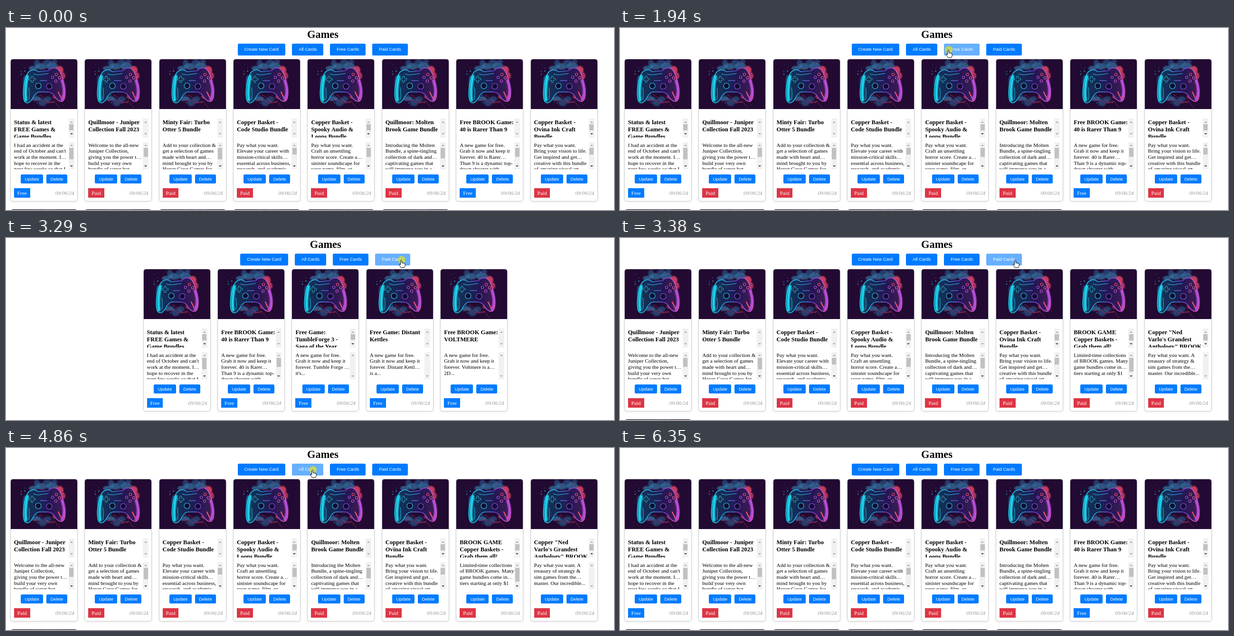
Recreate the animation shown at these times as an HTML page. Size 1280 by 384 pixels, loop 6.94 s.

```html
<!DOCTYPE html>
<html lang="en">
<head>
<meta charset="utf-8">
<title>Games</title>
<style>
html, body { margin: 0; width: 100%; height: 100%; overflow: hidden; background: #fff; }
body { position: relative; color: #000; font: 11.2px/12.6px "Liberation Serif", "Times New Roman", serif; white-space: nowrap; }
#page, #cursor, #click, .card, .card > * { position: absolute; }
#page { left: 0; top: 0; }
h1 { position: absolute; left: 0; top: .8px; width: 1334px; margin: 0; font-size: 22.4px; line-height: 26px; text-align: center; }
#bar { position: absolute; left: 487.6px; top: 33.2px; display: flex; gap: 14.1px; }
.btn { background: #007bff; color: #fff; border-radius: 2.8px; font: 9.4px/24.5px "Liberation Sans", Arial, sans-serif; padding: 0 14px; }
.btn.hover { background: #66b0ff; }
.card { width: 142px; height: 300.5px; box-sizing: border-box; border: 1px solid #ccc; border-radius: 5.6px; overflow: hidden; background: #fff; box-shadow: 0 1px 4px rgba(0,0,0,.1); }
.card svg { left: 0; top: 0; width: 141px; height: 105px; }
.scroll { left: 7px; width: 127px; overflow: hidden; box-sizing: border-box; }
.title { top: 125.2px; height: 39.5px; padding-top: 1px; font-weight: bold; font-size: 12.6px; line-height: 14.6px; }
.text { top: 174.7px; height: 57.3px; }
.rail { position: absolute; right: 0; top: 0; width: 12px; height: 100%; background: #f1f1f1; }
.rail::before, .rail::after { content: ""; position: absolute; left: 3px; border: 3px solid transparent; }
.rail::before { top: 2.5px; border-bottom-color: #a3a3a3; }
.rail::after { bottom: 2.5px; border-top-color: #a3a3a3; }
.rail.on::after { border-top-color: #444; }
.rail i { position: absolute; left: 1.5px; top: 12px; width: 9px; background: #c1c1c1; }
.card .btn { top: 242.6px; line-height: 19px; padding: 0 8.4px; }
.badge { left: 7px; top: 271.6px; padding: 0 7px; color: #fff; line-height: 20px; }
.date { right: 6.3px; top: 271.6px; color: #999; font-style: italic; line-height: 20px; }
#click { width: 16px; height: 16px; border-radius: 50%; background: rgba(205,218,62,.8); }
#cursor { width: 14px; height: 20px; overflow: visible; }
#cursor path { fill: #fff; stroke: #000; stroke-linejoin: round; }
</style>
</head>
<body>
<svg width="0" height="0" style="position:absolute">
  <defs>
    <linearGradient id="neon">
      <stop offset=".05" stop-color="#18d3ee"/><stop offset=".38" stop-color="#2c8fd8"/>
      <stop offset=".62" stop-color="#6a40d0"/><stop offset=".85" stop-color="#c455e0"/><stop offset="1" stop-color="#ff5a86"/>
    </linearGradient>
    <filter id="soft"><feGaussianBlur stdDeviation="1.3"/></filter>
    <symbol id="art" viewBox="0 0 141 105"></symbol>
  </defs>
</svg>
<div id="page"></div>
<div id="click"></div>
<svg id="cursor"><path/></svg>
<script>
const LOOP = 6940;
const $ = id => document.getElementById(id);

// title lines, title thumb, text lines, text thumb, free?
const games = [
  ["Status & latest|FREE Games &|Game Bundles", 13, "I had an accident at the|end of October and can't|work at the moment. I…|hope to recover in the|next few weeks so that I", 24, 1],
  ["Quillmoor - Juniper|Collection Fall 2023", 0, "Welcome to the all-new|Juniper Collection,|giving you the power t…|build your very own|bundle of super hot", 19],
  ["Minty Fair: Turbo|Otter 5 Bundle", 0, "Add to your collection &|get a selection of games|made with heart and…|mind brought to you by|Heron Cove Games for", 24],
  ["Copper Basket -|Code Studio Bundle", 0, "Pay what you want.|Elevate your career with|mission-critical skills…|essential across business,|research, and academic", 14],
  ["Copper Basket -|Spooky Audio &|Loops Bundle", 13, "Pay what you want.|Craft an unsettling|horror score. Create a…|sinister soundscape for|your game, film, or", 19],
  ["Quillmoor: Molten|Brook Game Bundle", 0, "Introducing the Molten|Bundle, a spine-tingling|collection of dark and…|captivating games that|will immerse you in a", 22],
  ["Free BROOK Game:|40 is Rarer Than 9", 0, "A new game for free.|Grab it now and keep it|forever. 40 is Rarer…|Than 9 is a dynamic top-|down shooter with", 19, 1],
  ["Copper Basket -|Ovina Ink Craft|Bundle", 13, "Pay what you want.|Bring your vision to life.|Get inspired and get…|creative with this bundle|of amazing visual art", 14],
  ["Free Game:|TumbleForge 3 -|Saga of the Year", 12, "A new game for free.|Grab it now and keep it|forever. Tumble Forge …|it's...", 0, 1],
  ["Free Game: Distant|Kettles", 0, "A new game for free.|Grab it now and keep it|forever. Distant Kettl…|is a...", 0, 1],
  ["Free BROOK Game:|VOLTMERE", 0, "A new game for free.|Grab it now and keep it|forever. Voltmere is a…|2D...", 0, 1],
  ["BROOK GAME|Copper Baskets -|Grab them all!", 13, "Limited-time collections|of BROOK games. Many|game bundles come in…|tiers starting at only $1", 29],
  ["Copper \"Ned|Varlo's Grandest|Anthology\" BROOK", 13, "Pay what you want. A|treasury of strategy &|sim games from the…|master. Our incredible...", 0]
];

const views = {
  all:  { ids: [0, 1, 2, 3, 4, 5, 6, 7], x: 8.8, shift: 0, below: 6 },
  free: { ids: [0, 6, 8, 9, 10], x: 288.6, shift: 5.8, below: 0 },
  paid: { ids: [1, 2, 3, 4, 5, 7, 11, 12], x: 8.8, shift: 0, below: 1 }
};
const viewTimes = [[0, "all"], [2030, "free"], [3380, "paid"], [4940, "all"]];
const clicks = [[1940, 2030], [3290, 3380], [4860, 4940]];

// start, end, number of steps, points
const moves = [
  [250, 920, 9, [[1232, 352], [1008, 199], [847, 89], [751, 24], [719, 2]]],
  [1010, 1180, 3, [[710, 14], [702, 28], [697, 38]]],
  [1270, 1940, 9, [[680, 44], [642, 46], [638, 46], [672, 46], [691, 46]]],
  [2620, 2870, 4, [[715, 48], [770, 52], [820, 53], [836, 50]]],
  [3040, 3120, 2, [[834, 48], [832, 46]]],
  [4290, 4860, 8, [[826, 47], [790, 49], [725, 50], [668, 48], [650, 46], [645, 46]]],
  [6020, 6270, 4, [[700, 56], [850, 80], [1030, 111], [1231, 145]]]
];
const SHOWN = [250, 6350];

const ARROW = "M.5.5V16L4.2 12.6 6.6 18.3 9 17.3 6.6 11.8H11.6Z";
const HAND = "M-1.3 9V1.6Q0-.6 1.3 1.6V6.4L6 7.3Q8.4 7.8 8.3 10V12.5L6.6 16.4H-.6Q-1.5 14.4-4 11.2-4.6 9-2.8 9.2L-1.3 10.5Z";

function drawArt() {
  let seed = 7;
  const rand = () => (seed = seed * 16807 % 2147483647) / 2147483647;
  const blob = (x, y, rx, ry, fill, o = 1) => `<ellipse cx="${x}" cy="${y}" rx="${rx}" ry="${ry}" fill="${fill}" opacity="${o}"/>`;
  const line = (d, color, w) => `<path d="${d}" fill="none" stroke="${color}" stroke-width="${w}" stroke-linecap="round"/>`;
  let dots = "";
  for (let i = 0; i < 45; i++) {
    const x = 22 + rand() * 98, r = .3 + rand() * 1.1;
    dots += blob(x, 4 + rand() * 95, r, r, x < 62 ? "#2ba5d4" : x < 88 ? "#6c58c8" : "#e84a78", .75);
  }
  const smoke = [[55, 9, 6, 9], [64, 15, 12, 7], [77, 8, 9, 8], [87, 15, 12, 8], [92, 5, 6, 5], [47, 19, 9, 5], [67, 91, 9, 8], [53, 83, 11, 5], [78, 84, 8, 6]]
    .map((s, i) => blob(...s, i % 2 ? "#346f9f" : "#274c7c", .75)).join("");
  const body = "M40 25C32 29 24 60 27 82 29 95 38 95 45 84 50 74 55 68 64 69 76 69 84 67 91 76 99 90 109 93 113 83 117 70 110 36 102 24 95 15 84 18 80 24L58 26C50 21 46 21 40 25Z";
  const pads = [[58, 56, 6, "#2bbbe2"], [81, 57, 6, "#8a4be0"], [88, 38, 2.5, "#b05ae8"], [96, 32, 2.5, "#ff557e"], [103, 39, 2.5, "#f66ac0"], [95, 46, 2.5, "#d45ae0"]]
    .map(([x, y, r, c]) => `<circle cx="${x}" cy="${y}" r="${r}" fill="#120c30" stroke="${c}" stroke-width="1.2"/>`).join("");
  $("art").innerHTML = `<rect width="141" height="105" fill="#220a32"/><g filter="url(#soft)">` + smoke
    + blob(103, 23, 8, 9, "#ee4a68", .8) + blob(110, 35, 5, 7, "#e34572", .7) + blob(96, 79, 8, 5, "#c63c66", .7) + blob(30, 49, 4, 15, "#1e7fae", .7) + "</g>" + dots
    + line("M48 88C62 78 70 98 83 91S95 98 103 101", "#a42a58", .9) + line("M60 75C75 80 76 99 93 88", "#c73a62", .7)
    + `<path d="${body}" fill="#120c33"/><path d="${body}" fill="url(#neon)" fill-opacity=".2" stroke="url(#neon)" stroke-width="1.6"/>`
    + `<g filter="url(#soft)">` + line("M35 36C31 55 30 72 32 86", "#1bd5ee", 6) + line("M108 45C114 62 113 76 108 85", "#b84fdf", 6) + "</g>"
    + line("M38 60C40 72 39 80 38 85", "#1996bd", 1.5) + line("M100 69C103 75 104 78 106 81", "#ff527e", 2)
    + line("M48 31C58 35 68 31 79 30", "#2b86c0", 1.5) + line("M62 45H76", "#5c62d2", 1.5)
    + line("M40 42H50M45 37V47", "#29d2ee", 4.6) + line("M40 42H50M45 37V47", "#17203f", 2.8) + pads;
}

const lines = s => s.replace(/&/g, "&amp;").split("|").join("<br>");
const scroller = (kind, text, thumb) => `<div class="scroll ${kind}">${lines(text)}
  <div class="rail ${thumb ? "on" : ""}"><i style="height:${thumb}px"></i></div></div>`;

function card(x, y, game) {
  let inner = `<svg><use href="#art"/></svg>`;
  if (game) {
    const [title, thumb, text, textThumb, free] = game;
    inner += scroller("title", title, thumb) + scroller("text", text, textThumb)
      + `<span class="btn" style="left:21.2px">Update</span><span class="btn" style="left:75.3px">Delete</span>`
      + `<span class="badge" style="background:${free ? "#007bff" : "#dc3545"}">${free ? "Free" : "Paid"}</span>`
      + `<span class="date">09/06/24</span>`;
  }
  return `<div class="card" style="left:${x}px;top:${y}px">${inner}</div>`;
}

let current;
function show(name) {
  if (name === current) return;
  current = name;
  const { ids, x, shift, below } = views[name];
  const at = i => x + i * 156.4;
  let html = `<div style="position:absolute;left:${shift}px"><h1>Games</h1><div id="bar">`
    + ["Create New Card", "All Cards", "Free Cards", "Paid Cards"].map(s => `<span class="btn">${s}</span>`).join("") + "</div></div>";
  ids.forEach((id, i) => html += card(at(i), 65.2, games[id]));
  for (let i = 0; i < below; i++) html += card(at(i), 382.2);
  $("page").innerHTML = html;
}

function pointer(t) {
  const move = moves.filter(m => t >= m[0]).pop();
  if (!move) return moves[0][3][0];
  const [start, end, steps, pts] = move;
  const k = Math.min(steps - 1, Math.floor((t - start) / (end - start) * (steps - 1) + .06));
  const p = k / (steps - 1) * (pts.length - 1);
  const i = Math.min(Math.floor(p), pts.length - 2);
  return pts[i].map((v, axis) => v + (pts[i + 1][axis] - v) * (p - i));
}

function render(t) {
  show(viewTimes.filter(v => t >= v[0]).pop()[1]);
  const [x, y] = pointer(t);
  const visible = t >= SHOWN[0] && t < SHOWN[1];
  let over = false;
  for (const b of $("bar").children) {
    const r = b.getBoundingClientRect();
    const hit = visible && x >= r.left && x <= r.right && y >= r.top && y <= r.bottom;
    b.classList.toggle("hover", hit);
    over = over || hit;
  }
  const cursor = $("cursor"), click = $("click");
  cursor.style.display = visible ? "" : "none";
  cursor.style.left = x + "px";
  cursor.style.top = y + "px";
  cursor.firstChild.setAttribute("d", over ? HAND : ARROW);
  click.style.display = clicks.some(([a, b]) => t >= a && t < b) ? "" : "none";
  click.style.left = x - 7.5 + "px";
  click.style.top = y - 8 + "px";
}

drawArt();
const began = performance.now();
function tick() {
  render((performance.now() - began) % LOOP);
  requestAnimationFrame(tick);
}
tick();
</script>
</body>
</html>
```
